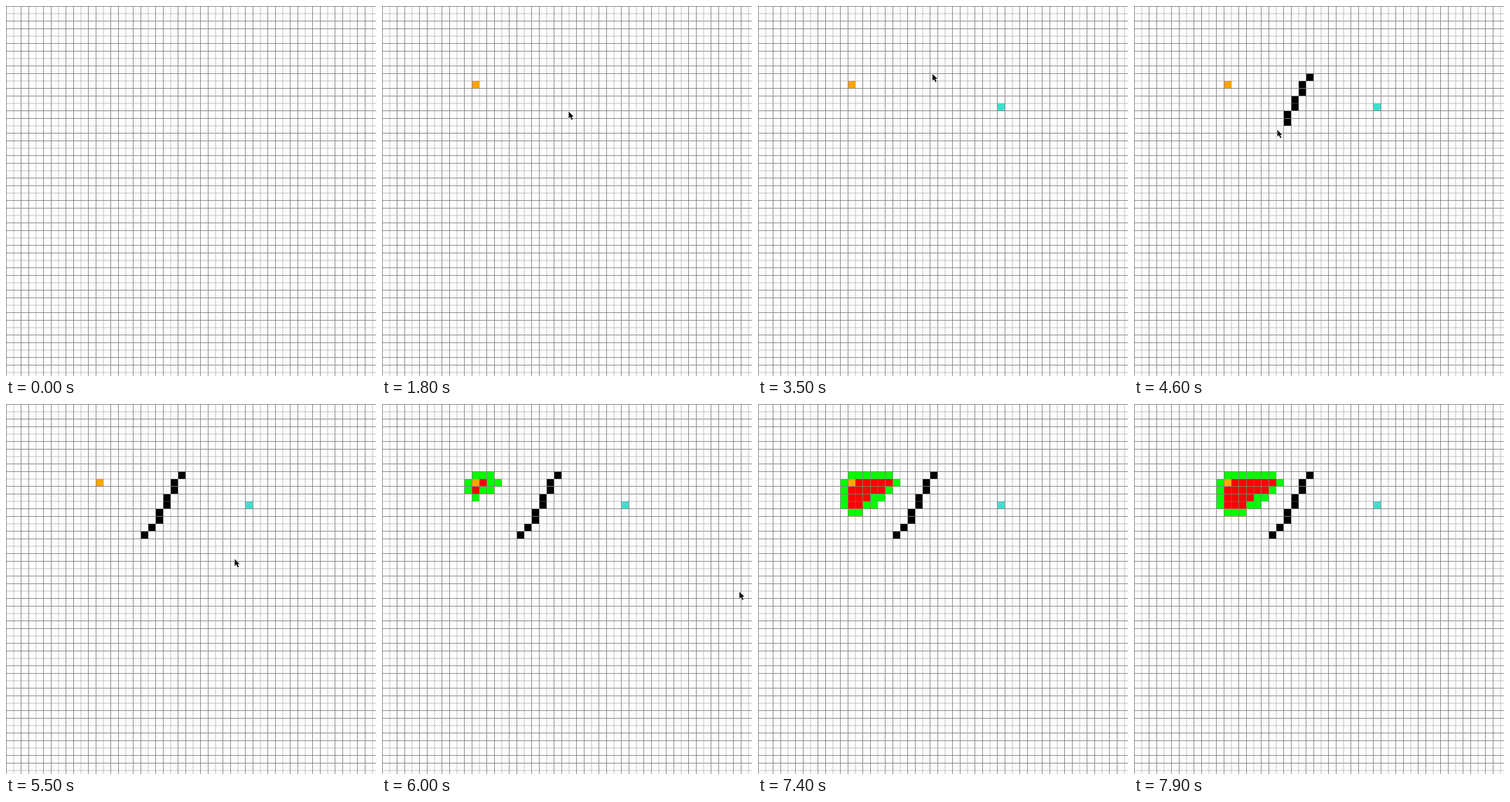
Write an HTML page with a canvas that moves like this. It is 528x528 px and loops after 8 s.

```html
<!DOCTYPE html>
<html lang="en">
<head>
<meta charset="utf-8">
<title>Path search on a grid</title>
<style>
  html, body { margin: 0; width: 100%; height: 100%; overflow: hidden; background: #fdfdfd; }
  canvas { display: block; width: 528px; height: 528px; }
</style>
</head>
<body>
<canvas id="stage" width="528" height="528"></canvas>
<script>
const SIZE = 528, LOOP = 8000, TICK = 100;
const SEARCH_START = 5617, SEARCH_STEP = 1000 / 9;
const ctx = document.getElementById('stage').getContext('2d');

const START = { x: 12, y: 10, at: 1600 };
const END = { x: 32, y: 13, at: 2400 };

// A slanted wall, painted downwards one cell at a time
const WALL = Array.from({ length: 9 }, (_, i) => ({
  x: 23 - Math.floor(0.57 * i + 0.47), y: 9 + i, at: 3600 + 160 * i
}));

// The pointer eases from one stop to the next, bowed sideways by (bx, by)
const ENTRY = { x: 188, y: 163 };
const STROKES = [
  { from: 900, to: 1400, x: 131, y: 113, bx: -37, by: -6 },
  { from: 1500, to: 2200, x: 344, y: 143, bx: 54, by: 27 },
  { from: 2300, to: 3300, x: 249, y: 97, bx: 5, by: 143 },
  { from: 3500, to: 5000, x: 195, y: 188, bx: 0, by: 8 },
  { from: 5100, to: 6000, x: 510, y: 268, bx: 0, by: 0 },
  { from: 6000, to: 6900, x: 516, y: 272, bx: 0, by: 4 }
];
const ARROW = new Path2D('M0 0V9.8L2.3 7.7L4.2 11.8L5.9 11L4.2 7.1H7.1Z');

const key = (x, y) => x + ',' + y;
const blocked = new Set(WALL.map(c => key(c.x, c.y)));

// A* with Manhattan distance; ties go to the node queued first
function search(steps) {
  const cost = new Map([[key(START.x, START.y), 0]]);
  const cells = new Map();
  const queue = [{ x: START.x, y: START.y, f: 0, order: 0 }];
  let order = 0, current = null;
  for (let i = 0; i < steps; i++) {
    if (current) cells.set(key(current.x, current.y), { ...current, colour: '#f00' });
    queue.sort((a, b) => a.f - b.f || a.order - b.order);
    current = queue.shift();
    const g = cost.get(key(current.x, current.y)) + 1;
    for (const [dx, dy] of [[1, 0], [-1, 0], [0, 1], [0, -1]]) {
      const x = current.x + dx, y = current.y + dy, id = key(x, y);
      if (blocked.has(id) || g >= (cost.get(id) ?? Infinity)) continue;
      cost.set(id, g);
      const f = g + Math.abs(END.x - x) + Math.abs(END.y - y);
      queue.push({ x, y, f, order: ++order });
      cells.set(id, { x, y, colour: '#0f0' });
    }
  }
  return cells.values();
}

// Three cells span 32 pixels
const edge = n => Math.ceil(n * 32 / 3);

function fillCell({ x, y }, colour) {
  ctx.fillStyle = colour;
  ctx.fillRect(edge(x), edge(y), edge(x + 1) - edge(x), edge(y + 1) - edge(y));
}

// Every third line falls between two pixels and looks wide and pale
function drawGrid() {
  for (let n = 0; edge(n) < SIZE; n++) {
    const split = n % 3 === 1;
    const pos = Math.floor(n * 32 / 3), width = split ? 2 : 1;
    ctx.fillStyle = `rgba(128,128,128,${split ? 0.24 : 0.87})`;
    ctx.fillRect(pos, 0, width, SIZE);
    ctx.fillRect(0, pos, SIZE, width);
  }
}

function drawPointer(t) {
  const last = STROKES.length - 1;
  if (t < STROKES[0].from || t > STROKES[last].to) return;
  const i = STROKES.findLastIndex(s => t >= s.from);
  const a = STROKES[i - 1] ?? ENTRY, b = STROKES[i];
  const s = Math.min(1, (t - b.from) / (b.to - b.from));
  const k = s * s * (3 - 2 * s), bow = 4 * k * (1 - k);
  ctx.save();
  ctx.translate(a.x + (b.x - a.x) * k + b.bx * bow, a.y + (b.y - a.y) * k + b.by * bow);
  ctx.strokeStyle = '#fff';
  ctx.lineWidth = 1.2;
  ctx.stroke(ARROW);
  ctx.fillStyle = '#111';
  ctx.fill(ARROW);
  ctx.restore();
}

function draw(t) {
  ctx.fillStyle = '#fdfdfd';
  ctx.fillRect(0, 0, SIZE, SIZE);
  if (t >= SEARCH_START) {
    const steps = 1 + Math.floor((t - SEARCH_START) / SEARCH_STEP);
    for (const cell of search(steps)) fillCell(cell, cell.colour);
  }
  if (t >= START.at) fillCell(START, '#ffa500');
  if (t >= END.at) fillCell(END, '#40e0d0');
  for (const cell of WALL) if (t >= cell.at) fillCell(cell, '#000');
  drawGrid();
  drawPointer(t);
}

let origin = null, shown = -1;
function frame(now) {
  origin ??= now;
  const t = Math.floor(((now - origin) % LOOP) / TICK) * TICK;
  if (t !== shown) draw(shown = t);
  requestAnimationFrame(frame);
}
draw(0);
requestAnimationFrame(frame);
</script>
</body>
</html>
```
